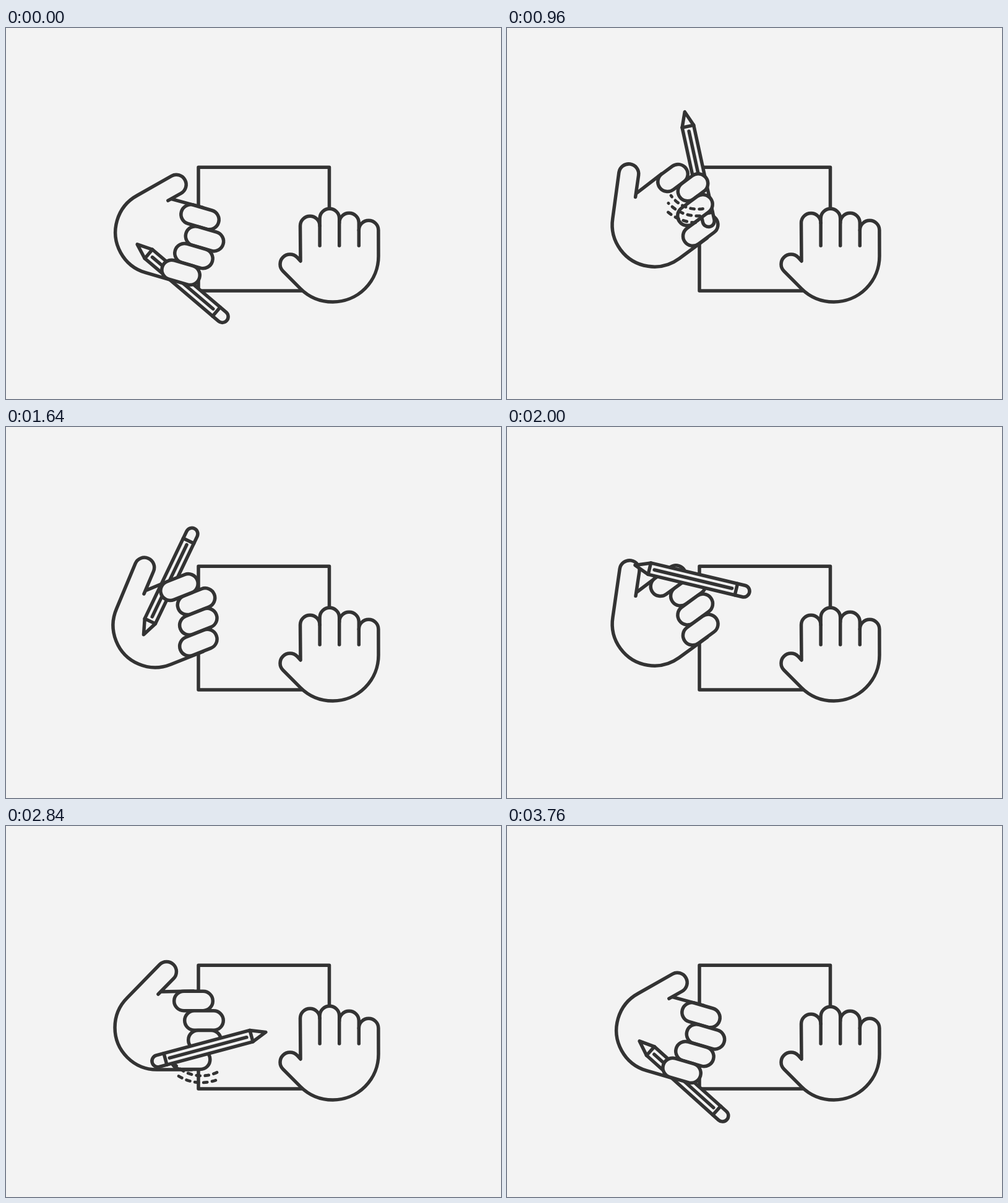
An HTML page with a canvas for the animation above (3.8 s loop, 800 px wide and 600 px high).

```html
<!DOCTYPE html>
<html lang="en">
<head>
<meta charset="utf-8">
<title>Pen spinning</title>
<style>
html, body { margin: 0; width: 800px; height: 600px; overflow: hidden; background: #f3f3f3; }
canvas { display: block; }
</style>
</head>
<body>
<canvas id="stage" width="800" height="600"></canvas>
<script>
const ctx = document.getElementById('stage').getContext('2d');
const LOOP = 3800, INK = '#333', PAPER = '#f3f3f3', LINE = 5.5;
const PIVOT = { x: 229, y: 331 };

const rad = deg => deg * Math.PI / 180;
const bump = (t, center, half) =>
  Math.abs(t - center) < half ? Math.cos((t - center) / half * Math.PI / 2) ** 2 : 0;
const ramp = (t, from, to) => {
  const u = Math.min(1, Math.max(0, (t - from) / (to - from)));
  return u * u * (3 - 2 * u);
};

// The pen at each catch; it makes seven turns per loop
const catches = [
  { t: 0, angle: 220.4, x: 284.5, y: 411.5 },
  { t: 600, angle: -192.3, x: 323, y: 310.5 },
  { t: 960, angle: -462.3, x: 307.5, y: 228.5 },
  { t: 1640, angle: -964.4, x: 263.5, y: 250 },
  { t: 2320, angle: -1486.9, x: 329.5, y: 242 },
  { t: 2840, angle: -1815, x: 328, y: 358 },
  { t: LOOP, angle: 220.4 - 7 * 360, x: 284.5, y: 411.5 }
];

// Motion lines: centre, inner radius, angle behind the pen tip, number of arcs
const trails = [
  { t: 600, x: 313, y: 323, r: 77, lag: 188, count: 3 },
  { t: 960, x: 308, y: 240, r: 53, lag: 183, count: 3 },
  { t: 2320, x: 304, y: 239, r: 59, lag: 61, count: 2 },
  { t: 2840, x: 316, y: 345, r: 59, lag: 80, count: 2 }
];

// Index to pinky, with the times at which each one stretches
const gripFingers = [
  { x: 303, stretch: [960] },
  { x: 320, stretch: [960, 2320] },
  { x: 311, stretch: [600, 2840] },
  { x: 298.5, stretch: [] }
];
const tappingTops = [320, 308, 315, 327];

// Monotone cubic through the catches
function penValue(t, key) {
  const slope = i => (catches[i + 1][key] - catches[i][key]) / (catches[i + 1].t - catches[i].t);
  const tangent = i => {
    if (i === 0 || i === catches.length - 1) return 0;
    const a = slope(i - 1), b = slope(i);
    return a * b > 0 ? 2 * a * b / (a + b) : 0;
  };
  const i = catches.findLastIndex(c => c.t <= t);
  const a = catches[i], b = catches[i + 1];
  const h = b.t - a.t, u = (t - a.t) / h, v = 1 - u;
  return a[key] * v * v * (1 + 2 * u) + b[key] * u * u * (3 - 2 * u)
    + h * u * v * (v * tangent(i) - u * tangent(i + 1));
}

const handAngle = t =>
  16.3 - 54.5 * (ramp(t, 120, 1060) - ramp(t, 1808, 3428)) + 16.5 * bump(t, 1640, 360);
const thumbReach = t => -12 + 15.5 * (ramp(t, 600, 1140) - ramp(t, 2600, 3300));

function shape(build, filled = true) {
  ctx.beginPath();
  build();
  if (filled) ctx.fill();
  ctx.stroke();
}

function line(x1, y1, x2, y2) {
  shape(() => { ctx.moveTo(x1, y1); ctx.lineTo(x2, y2); }, false);
}

function inHand(angle, paint) {
  ctx.save();
  ctx.translate(PIVOT.x, PIVOT.y);
  ctx.rotate(rad(angle));
  ctx.translate(-PIVOT.x, -PIVOT.y);
  paint();
  ctx.restore();
}

function drawPalm(reach) {
  const d = reach * Math.SQRT1_2;
  shape(() => {
    ctx.moveTo(303, 267);
    ctx.lineTo(250, 268);
    ctx.lineTo(246, 272);
    ctx.arc(260 + d, 235 - d, 16, rad(45), rad(225), true);
    ctx.arc(244, 326, 68, rad(225), rad(90), true);
    ctx.lineTo(300, 394);
  });
}

function drawGripFinger(i, t) {
  const finger = gripFingers[i], r = 15.7;
  const stretch = Math.max(0, ...finger.stretch.map(c => bump(t, c, 240)));
  const x = finger.x + 10 * stretch, y = 283 + 31.6 * i, reach = 15.6 - 5 * stretch;
  shape(() => {
    ctx.arc(x - reach, y, r, rad(90), rad(270));
    ctx.arc(x + reach, y, r, rad(-90), rad(90));
    ctx.closePath();
  });
}

function drawPen(x, y, angle) {
  ctx.save();
  ctx.translate(x, y);
  ctx.rotate(rad(angle));
  shape(() => {
    ctx.moveTo(95, 0);
    ctx.lineTo(71, -9.5);
    ctx.arc(-85.5, 0, 9.5, rad(-90), rad(90), true);
    ctx.lineTo(71, 9.5);
    ctx.closePath();
  });
  line(71, -9.5, 71, 9.5);
  line(-73, -9.5, -73, 9.5);
  line(63, 0, -66, 0);
  ctx.restore();
}

function drawTrails(t, penAngle) {
  ctx.save();
  ctx.lineWidth = 4.8;
  ctx.setLineDash([6, 8]);
  for (const trail of trails) {
    const size = bump(t, trail.t, 200);
    for (let i = 0; size && i < trail.count; i++) {
      const from = penAngle + trail.lag + 6 * i;
      const span = 1.2 * trail.r * (1 - 0.2 * i) * size;
      shape(() => ctx.arc(trail.x, trail.y, trail.r + 11 * i, rad(from), rad(from + span)), false);
    }
  }
  ctx.restore();
}

// The fingers tap twice per loop, from pinky to index
function drawTappingHand(t) {
  const r = 15.8, left = 475.5;
  const tops = tappingTops.map((y, i) => {
    const peak = 450 + 36 * (3 - i) ** 2;
    return y - 11 * (bump(t, peak, 340) + bump(t, peak + 1970, 340));
  });
  shape(() => {
    ctx.moveTo(476, 377);
    tops.forEach((y, i) => ctx.arc(left + r * (2 * i + 1), y, r, Math.PI, 0));
    ctx.arc(528, 369, 74, 0, rad(135));
    ctx.arc(459, 382, 16, rad(135), rad(315));
    ctx.closePath();
  });
  for (let i = 1; i < 4; i++) {
    const x = left + 2 * r * i;
    line(x, Math.max(tops[i - 1], tops[i]), x, 352);
  }
}

// Fingers lying over the pen
function holding(t) {
  if (t < 300 || t > 3050) return [3];
  if (t < 750) return [2];
  if (t < 1150) return [1, 2];
  return t < 1850 ? [0] : [];
}

function draw(t) {
  const angle = penValue(t, 'angle'), hand = handAngle(t), held = holding(t);
  const drawFingers = over => gripFingers.forEach((_, i) => {
    if (held.includes(i) === over) drawGripFinger(i, t);
  });
  ctx.fillStyle = PAPER;
  ctx.fillRect(0, 0, 800, 600);
  ctx.strokeStyle = INK;
  ctx.lineWidth = LINE;
  ctx.lineCap = ctx.lineJoin = 'round';
  shape(() => ctx.rect(311, 225.3, 211.5, 199.7));
  drawTappingHand(t);
  inHand(hand, () => { drawPalm(thumbReach(t)); drawFingers(false); });
  drawPen(penValue(t, 'x'), penValue(t, 'y'), angle);
  inHand(hand, () => drawFingers(true));
  drawTrails(t, angle);
}

function tick() {
  draw(Math.floor(performance.now() % LOOP / 40) * 40);
  requestAnimationFrame(tick);
}
tick();
</script>
</body>
</html>
```
